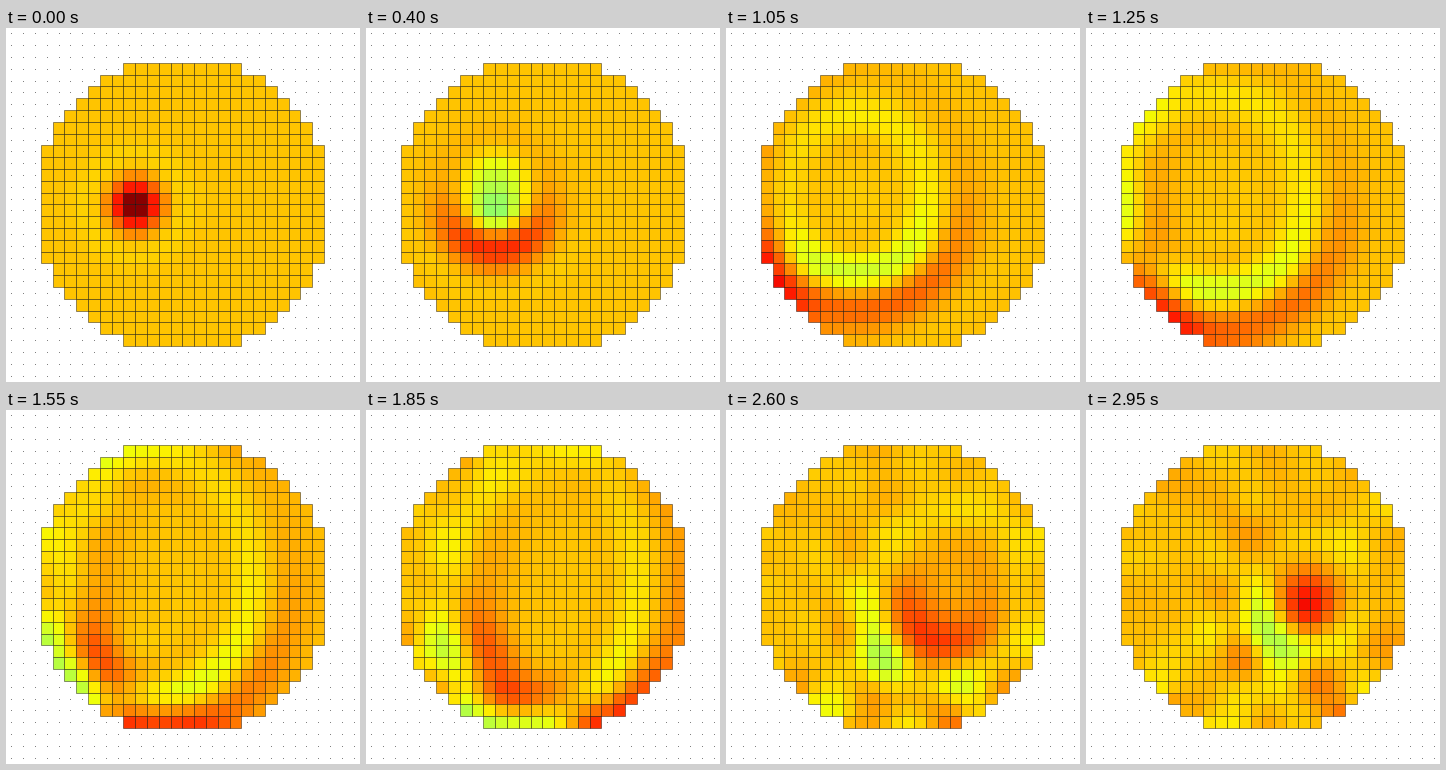
A matplotlib script for the animation above (3000 ms loop, 354 by 354 pixels).

```python
import numpy as np
import matplotlib.pyplot as plt
from matplotlib.animation import FuncAnimation
from matplotlib.collections import PolyCollection

SIZE, DPI = 354, 100
FRAMES, INTERVAL = 60, 50
GRID, MARGIN = 30, 3
SPEED = 0.4        # cells per frame
CUTOFF = 1.2       # wavenumber scale of the pulse, radians per cell
DRIFT = 1.25       # downward push of the pulse relative to the wave speed
DECAY = 0.5        # share of the pulse already falling at the start
REST, PEAK = 0.70, 0.29


def disc_cells(n=24, radius=12.5):
    c = np.arange(n) - (n - 1) / 2
    return np.argwhere(np.hypot(c[:, None], c[None, :]) <= radius)


def neumann_laplacian(cells, index):
    lap = np.zeros((len(cells), len(cells)))
    for i, (r, c) in enumerate(cells):
        for other in ((r + 1, c), (r, c + 1)):
            j = index.get(other)
            if j is not None:
                lap[i, i] += 1
                lap[j, j] += 1
                lap[i, j] = lap[j, i] = -1
    return lap


cells = disc_cells()
index = {(int(r), int(c)): i for i, (r, c) in enumerate(cells)}
lam, modes = np.linalg.eigh(neumann_laplacian(cells, index))
k = np.sqrt(np.maximum(lam, 1e-9))

# Smooth pulse centred on a grid corner left of the middle
weight = np.exp(-(k / CUTOFF) ** 4)
above = (modes[index[11, 7]] + modes[index[11, 8]]) / 2
below = (modes[index[12, 7]] + modes[index[12, 8]]) / 2
shape = weight * (above + below) / 2
push = weight * DRIFT * (below - above) / k - DECAY * shape
gain = PEAK / (modes @ shape).max()


def field(frame):
    phase = k * SPEED * frame
    return gain * (modes @ (shape * np.cos(phase) + push * np.sin(phase)))


def edge(n):
    return (SIZE * (n + MARGIN) - 1) // GRID + 0.5


def box(x0, y0, x1, y1):
    return [(x0, y0), (x1, y0), (x1, y1), (x0, y1)]


fig = plt.figure(figsize=(SIZE / DPI, SIZE / DPI), dpi=DPI, facecolor="white")
ax = fig.add_axes([0, 0, 1, 1])
ax.set_xlim(0, SIZE)
ax.set_ylim(SIZE, 0)
ax.axis("off")

# One grey pixel in the middle of every grid square
mid = [SIZE * (2 * n + 1) // (2 * GRID) for n in range(GRID)]
dots = PolyCollection([box(x, y, x + 1, y + 1) for x in mid for y in mid],
                      facecolors="0.5", linewidths=0, zorder=0)
mesh = PolyCollection([box(edge(c), edge(r), edge(c + 1), edge(r + 1))
                       for r, c in cells],
                      edgecolors=[(0, 0, 0, 0.42)], linewidths=0.72, zorder=1)
for part in (dots, mesh):
    part.set_snap(False)
    ax.add_collection(part, autolim=False)
cmap = plt.get_cmap("jet")


def update(frame):
    mesh.set_facecolor(cmap(np.clip(REST + field(frame), 0, 1)))
    return [mesh]


anim = FuncAnimation(fig, update, frames=FRAMES, interval=INTERVAL,
                     init_func=lambda: update(0), repeat=True, repeat_delay=0)
plt.show()
```
